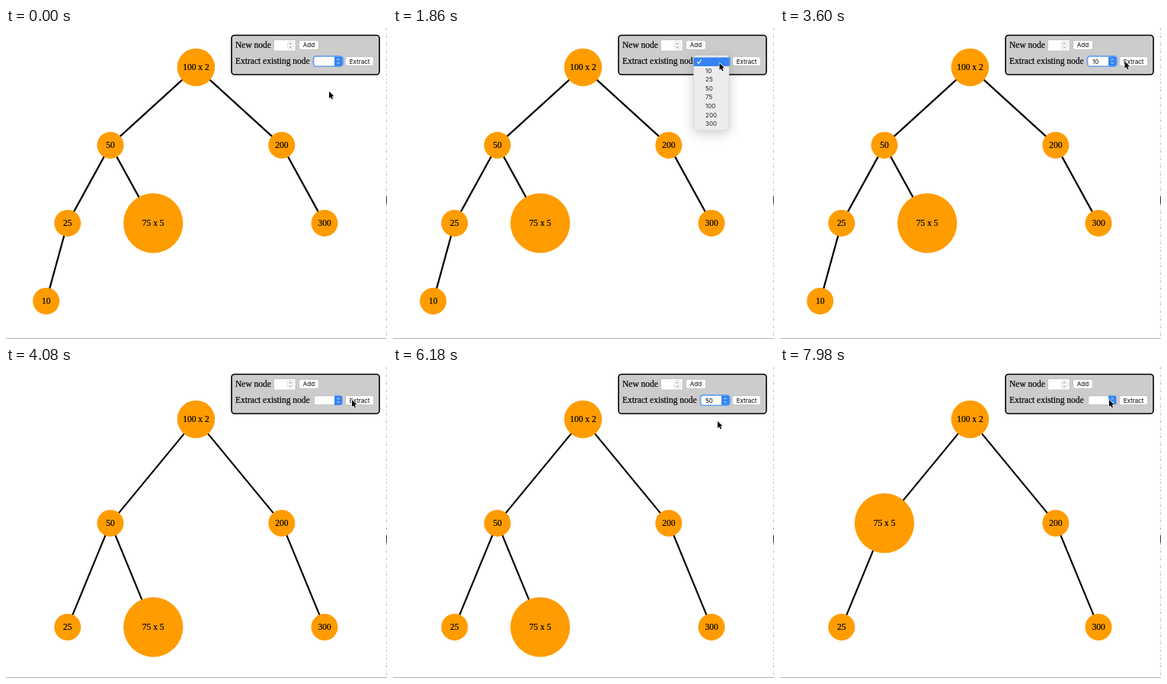
An HTML page with a canvas for the animation above (8 s loop, 500 px wide and 407 px high).

```html
<!DOCTYPE html>
<html lang="en">
<head>
<meta charset="utf-8">
<title>Tree extraction</title>
<style>
html, body { margin: 0; width: 100%; height: 100%; overflow: hidden; background: #fff; }
canvas { display: block; width: 500px; height: 407px; }
</style>
</head>
<body>
<canvas id="stage" width="500" height="407"></canvas>
<script>
const ctx = document.getElementById('stage').getContext('2d');
const LOOP = 8000, PRESS_TIME = 120;
const SERIF = '11.5px "Liberation Serif", serif';
const SANS = '8px Inter, sans-serif';
const BLUE = '#3583f5';
const MENU = { x: 394.5, y: 35.8, width: 46.5, top: 38.4, row: 11.6 };

// Binary search tree with repeated values counted in their node

function insert(node, value) {
  if (!node) return { value, count: 1 };
  if (value === node.value) node.count++;
  else {
    const side = value < node.value ? 'left' : 'right';
    node[side] = insert(node[side], value);
  }
  return node;
}

function remove(node, value) {
  if (value < node.value) return { ...node, left: remove(node.left, value) };
  if (value > node.value) return { ...node, right: remove(node.right, value) };
  if (!node.left || !node.right) return node.left || node.right;
  let next = node.right;
  while (next.left) next = next.left;
  return { ...next, left: node.left, right: remove(node.right, next.value) };
}

const inOrder = node => node ? [...inOrder(node.left), node.value, ...inOrder(node.right)] : [];
const height = node => node ? 1 + Math.max(height(node.left), height(node.right)) : 0;

// One extraction: the menu opens, closes on a value, then the button is pressed
const picks = [
  { value: 10, open: 1020, close: 3240, press: 3720, button: [454, 43] },
  { value: 50, open: 4860, close: 6180, press: 7140, button: [458, 48] }
];
let grown = [100, 50, 200, 25, 75, 300, 10, 100, 75, 75, 75, 75].reduce(insert, null);
for (const pick of picks) {
  pick.tree = grown;
  grown = remove(grown, pick.value);
}
const finalTree = grown;

// Pointer trips, each easing from wherever the previous one ended
const trips = picks.flatMap(({ tree, value, open, close, button }) => [
  { arrive: open - 60, time: 600, to: [428.5, 46] },
  { arrive: close - 240, time: 600, to: [426, MENU.top + (inOrder(tree).indexOf(value) + 1.8) * MENU.row] },
  { arrive: close + 420, time: 420, to: button }
]);
trips.push({ arrive: 7960, time: 340, to: [432, 43] });

function pointerAt(t) {
  return trips.reduce((from, { arrive, time, to }) => {
    const u = Math.min(1, Math.max(0, 1 - (arrive - t) / time));
    const k = u * u * (3 - 2 * u);
    return from.map((v, i) => v + (to[i] - v) * k);
  }, [424, 83]);
}

// Drawing helpers

function box(x, y, w, h, r, fill, stroke, width = 0.7) {
  ctx.beginPath();
  ctx.roundRect(x, y, w, h, r);
  if (fill) { ctx.fillStyle = fill; ctx.fill(); }
  if (stroke) { ctx.strokeStyle = stroke; ctx.lineWidth = width; ctx.stroke(); }
}

function text(value, x, y, font, align = 'left', color = '#000') {
  ctx.font = font;
  ctx.textAlign = align;
  ctx.fillStyle = ctx.strokeStyle = color;
  ctx.fillText(value, x, y);
  if (font === SERIF) {
    ctx.lineWidth = 0.2;
    ctx.strokeText(value, x, y);
  }
}

function polyline(points, color, width) {
  ctx.beginPath();
  points.forEach(([x, y]) => ctx.lineTo(x, y));
  ctx.strokeStyle = color;
  ctx.lineWidth = width;
  ctx.stroke();
}

function chevrons(x, y, color) {
  for (const d of [-1, 1])
    polyline([[x - 1.6, y + d * 1.4], [x, y + d * 3], [x + 1.6, y + d * 1.4]], color, 0.9);
}

// Scene

function drawNode(node, x, y, spread, rowHeight) {
  for (const [child, side] of [[node.left, -1], [node.right, 1]]) {
    if (!child) continue;
    const childX = x + side * spread, childY = y + rowHeight;
    polyline([[x, y], [childX, childY]], '#000', 2.2);
    drawNode(child, childX, childY, spread / 2, rowHeight);
  }
  ctx.beginPath();
  ctx.arc(x, y, 17.5 * Math.sqrt(node.count), 0, 2 * Math.PI);
  ctx.fillStyle = '#ff9c00';
  ctx.fill();
  const label = node.count > 1 ? `${node.value} x ${node.count}` : node.value;
  text(label, x, y + 3.2, SERIF, 'center');
}

function drawTree(tree) {
  const rowHeight = 408 / height(tree);
  drawNode(tree, 249.4, rowHeight / 2 + 0.4, 112.4, rowHeight);
}

function button(label, x, y, w, pressed) {
  box(x, y, w, 12, 2.5, pressed ? BLUE : '#fff', pressed ? BLUE : '#b5b5b5');
  text(label, x + w / 2, y + 9, SANS, 'center', pressed ? '#fff' : '#000');
}

function drawPanel(value, focused, pressed) {
  box(296, 9.5, 194, 51.5, 4, '#ccc', '#000', 1.6);
  text('New node', 301, 25.5, SERIF);
  text('Extract existing node', 301, 46.5, SERIF);
  box(351.5, 15.5, 28.5, 14.5, 0, '#fff', '#bbb');
  box(369.5, 17.5, 7.5, 10.5, 2.5, '#fff', '#ccc');
  chevrons(373.2, 22.8, '#666');
  button('Add', 384.5, 16.2, 26, false);
  button('Extract', 445.5, 37.5, 37, pressed);

  if (focused) box(403.6, 37, 38.3, 13, 3.5, null, '#629ff2', 2);
  box(404.5, 37.7, 36.5, 11.8, 2.5, '#fff', focused ? null : '#b5b5b5');
  box(431, 37.5, 10.3, 12.2, [0, 2.5, 2.5, 0], BLUE);
  chevrons(436.1, 43.6, '#fff');
  text(value, 410, 46.6, SANS);
}

function drawMenu(items, pointerY) {
  const { x, y, width, top, row } = MENU;
  const active = Math.floor((pointerY - top) / row);
  const menuHeight = (items.length + 1) * row + 5.4;
  ctx.save();
  ctx.shadowColor = 'rgba(0,0,0,.2)';
  ctx.shadowBlur = 16;
  ctx.shadowOffsetY = 4;
  box(x, y, width, menuHeight, 3.5, '#ececec');
  ctx.restore();
  box(x, y, width, menuHeight, 3.5, null, '#c4c4c4', 0.5);
  box(x, top + active * row, width, row, 0, BLUE);
  polyline([[399.2, 44.2], [401.1, 46.5], [404.6, 41.2]], active ? '#222' : '#fff', 1.1);
  items.forEach((item, i) =>
    text(item, 410, top + (i + 1.5) * row + 2.7, SANS, 'left', i + 1 === active ? '#fff' : '#222'));
}

function drawPointer(x, y) {
  ctx.save();
  ctx.translate(x, y);
  ctx.scale(0.86, 0.86);
  ctx.lineJoin = 'round';
  const outline = new Path2D('M0 0V10.5L2.4 8.3L4.1 12L5.9 11.2L4.2 7.6L7.5 7.4Z');
  ctx.strokeStyle = '#fff';
  ctx.lineWidth = 1.6;
  ctx.stroke(outline);
  ctx.fillStyle = '#000';
  ctx.fill(outline);
  ctx.restore();
}

function drawWindowEdge() {
  ctx.fillStyle = '#b4b4b4';
  ctx.fillRect(0, 406, 500, 1);
  ctx.setLineDash([3, 4, 1, 2]);
  polyline([[499.5, 0], [499.5, 407]], '#bbb', 1);
  ctx.setLineDash([]);
  ctx.fillStyle = '#333';
  ctx.fillRect(499, 220, 1, 10);
}

function render(t) {
  const [x, y] = pointerAt(t);
  const pick = picks.find(p => t < p.press + PRESS_TIME);
  const tree = pick ? pick.tree : finalTree;
  const opened = pick && t >= pick.open && t < pick.close;
  const chosen = pick && t >= pick.close;
  const pressed = pick && t >= pick.press;
  const focused = pick && !pressed && (pick === picks[0] || t >= pick.open);

  ctx.fillStyle = '#fff';
  ctx.fillRect(0, 0, 500, 407);
  drawWindowEdge();
  drawTree(tree);
  drawPanel(chosen ? pick.value : '', focused, pressed);
  if (opened) drawMenu(inOrder(tree), y);
  drawPointer(x, y);
}

const start = performance.now();
function tick() {
  render((performance.now() - start) % LOOP);
  requestAnimationFrame(tick);
}
tick();
</script>
</body>
</html>
```
